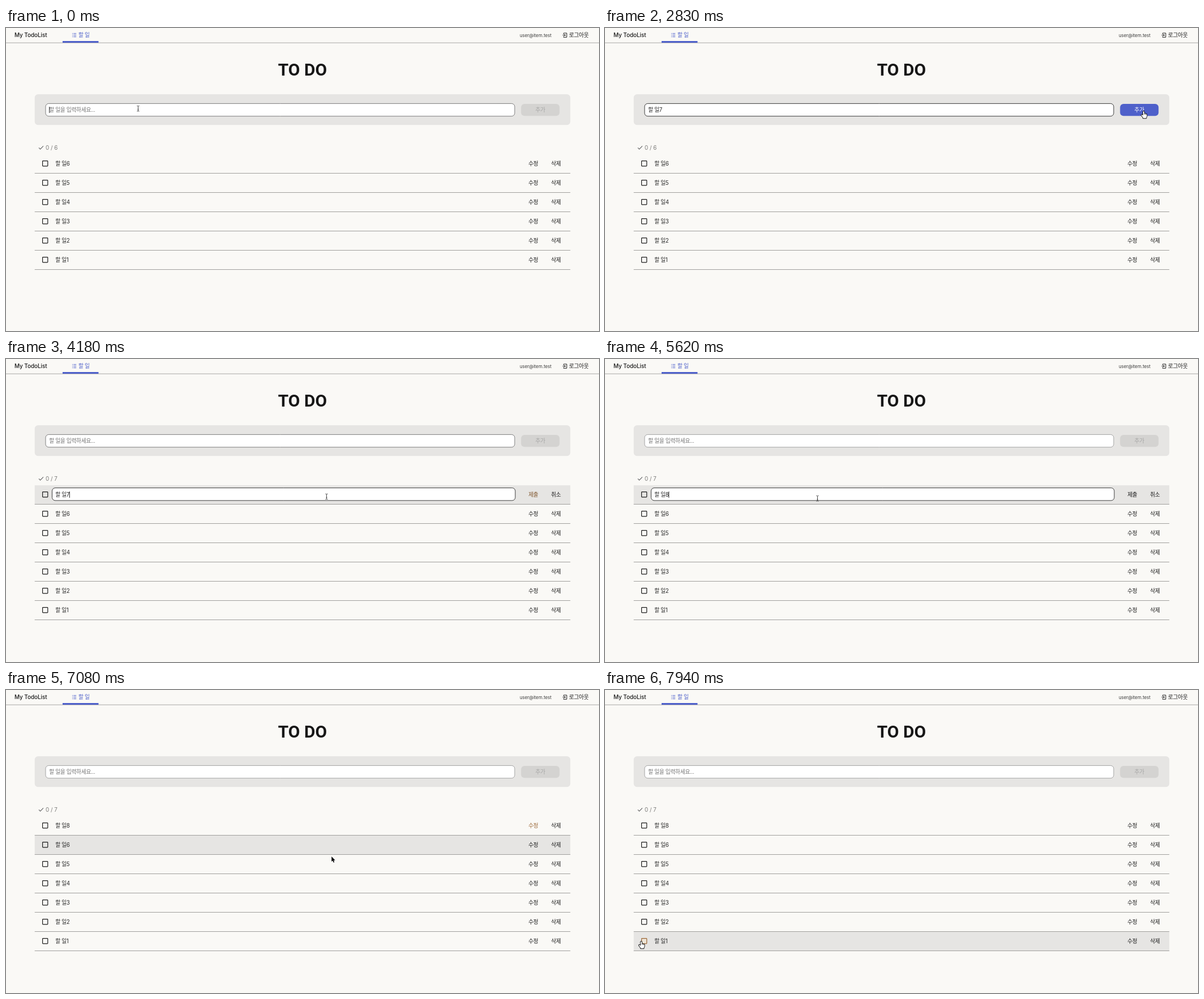
An HTML page with a canvas for the animation above (7.99 s loop, 1048x535 px).

```html
<!DOCTYPE html>
<html lang="ko">
<head>
<meta charset="utf-8">
<title>My TodoList</title>
<style>
  html, body { margin: 0; width: 100%; height: 100%; overflow: hidden; background: #faf9f6; }
  canvas { display: block; width: 1048px; height: 535px; }
</style>
</head>
<body>
<canvas id="stage"></canvas>
<script>
const W = 1048, H = 535, LOOP = 7990;
const TYPE = 680, KEY_GAP = 103, DIGIT = 2050, ADD = 2875;
const EDIT = 4050, ERASE = 5165, RETYPE = 5620, SUBMIT = 6690;
const BLINK = 550;
const LEFT = 50.7, RIGHT = 997.3, LIST_TOP = 223, ROW = 34;
const INK = [26, 26, 26], ACCENT = [186, 120, 58], BLUE = [78, 96, 202];
const GRAY = "#e6e5e3", LINE = "#a09f9d", BLUE_CSS = `rgb(${BLUE})`;
const SANS = "Inter, 'Noto Sans CJK KR', sans-serif";

const canvas = document.getElementById("stage");
const ctx = canvas.getContext("2d");
const dpr = window.devicePixelRatio || 1;
canvas.width = W * dpr;
canvas.height = H * dpr;

const home = { x: 233, y: 142 };
const glides = [
  { from: 2080, to: 2780, x: 952, y: 147 },
  { from: 3400, to: 3570, x: 966, y: 175 },
  { from: 3600, to: 3860, x: 932, y: 240 },
  { from: 4070, to: 4440, x: 375, y: 246 },
  { from: 5900, to: 6500, x: 930, y: 241 },
  { from: 7010, to: 7430, x: 98, y: 498 },
  { from: 7480, to: 7850, x: 64, y: 444 }
];

const stages = ["ㅎ", "하", "할", "할 ", "할 ㅇ", "할 이", "할 일"];
const keyTimes = stages.map((_, i) => TYPE + i * KEY_GAP);
const caretResets = [-120, ...keyTimes, DIGIT, ADD, EDIT, ERASE, RETYPE];

const clamp = v => Math.max(0, Math.min(1, v));
const ramp = (t, from, to, span = 200) => clamp((t - from) / span) - clamp((t - to) / span);
const mix = (a, b, k) => `rgb(${a.map((v, i) => Math.round(v + (b[i] - v) * k))})`;
const inside = (p, x0, y0, x1, y1) => p.x >= x0 && p.x <= x1 && p.y >= y0 && p.y <= y1;
const isEditing = t => t >= EDIT && t < SUBMIT;

// each glide starts fast and settles; y trails x, which bends the path
function pointer(t) {
  let { x, y } = home;
  for (const g of glides) {
    const k = 1 - (1 - clamp((t - g.from) / (g.to - g.from))) ** 3;
    x += (g.x - x) * k;
    y += (g.y - y) * k ** 1.85;
  }
  return { x, y };
}

function newItem(t) {
  if (t < TYPE || t >= ADD) return "";
  if (t >= DIGIT) return "할 일7";
  return stages[Math.min(stages.length - 1, Math.floor((t - TYPE) / KEY_GAP))];
}

const editedItem = t => "할 일" + (t < ERASE ? "7" : t < RETYPE ? "" : "8");

function text(str, x, cy, color, { size = 9.8, spacing = -0.38, weight = 400, align = "left" } = {}) {
  ctx.font = `${weight} ${size}px ${SANS}`;
  ctx.letterSpacing = spacing + "px";
  ctx.textAlign = align;
  ctx.fillStyle = color;
  ctx.fillText(str, x, cy + 3.6);
  return ctx.measureText(str).width;
}

function rect(x, y, w, h, color) {
  ctx.fillStyle = color;
  ctx.fillRect(x, y, w, h);
}

function strokePath(color, width) {
  ctx.strokeStyle = color;
  ctx.lineWidth = width;
  ctx.stroke();
}

function rounded(x, y, w, h, r, fill) {
  ctx.beginPath();
  ctx.roundRect(x, y, w, h, r);
  ctx.fillStyle = fill;
  ctx.fill();
}

function field(x, y, w, border) {
  rounded(x, y, w, 22.3, 5.5, "#fff");
  strokePath(border, 0.85);
}

function lines(color, width, d) {
  ctx.lineWidth = width;
  ctx.strokeStyle = color;
  ctx.stroke(new Path2D(d));
}

function header() {
  rect(0, 25.7, W, 0.9, LINE);
  text("My TodoList", 15, 12.6, "#1a1a1a", { size: 10, spacing: -0.1, weight: 500 });
  rect(100, 23, 63.5, 3, BLUE_CSS);
  for (let i = 0; i < 3; i++) {
    const y = 9.2 + i * 2.9;
    rect(117, y, 1.2, 1, BLUE_CSS);
    rect(119.3, y, 4.9, 1, BLUE_CSS);
  }
  text("할 일", 128, 12.6, BLUE_CSS);
  text("user@item.test", 964, 12.1, "#3a3a3a", { size: 7.9, spacing: 0, align: "right" });
  lines("#1a1a1a", 1, "M985.5 10.8V9H991V16.3H985.5V14.5M983.8 12.6H988.6M987 11L988.6 12.6 987 14.2");
  text("로그아웃", 995, 12.6, "#1a1a1a");
  ctx.font = "700 30px Roboto, sans-serif";
  ctx.letterSpacing = "0px";
  ctx.textAlign = "center";
  ctx.fillStyle = "#171717";
  ctx.fillText("TO DO", 524, 83.7);
}

function caret(t, x, y) {
  const last = Math.max(...caretResets.filter(r => r <= t));
  if (Math.floor((t - last) / BLINK) % 2 === 0) rect(x, y, 1, 11, "#222");
}

function form(t) {
  const focus = ramp(t, -70, EDIT), ready = ramp(t, TYPE, ADD);
  rounded(LEFT, 117, RIGHT - LEFT, 54.3, 6, GRAY);
  field(70, 133.4, 829, mix([150, 150, 150], INK, focus));
  const value = newItem(t), x = 76.2;
  const width = text(value || "할 일을 입력하세요...", x, 144.4, value ? "#2b2b2b" : "#757575");
  if (t < EDIT) caret(t, value ? x + width : x, 139);
  const composing = value && t < DIGIT && !value.endsWith(" ");
  if (composing) {
    const before = ctx.measureText(value.slice(0, -1)).width;
    rect(x + before, 149.3, width - before, 1, "#222");
  }
  rounded(910.3, 134, 68, 21.2, 6, mix([212, 211, 209], BLUE, ready));
  text("추가", 944.2, 144.4, mix([166, 166, 165], [255, 255, 255], ready), { spacing: -0.2, align: "center" });
}

function row(t, index, label, hovered, isLast) {
  const top = LIST_TOP + index * ROW, cy = top + 16;
  const edit = index === 0 && isEditing(t);
  if (hovered) rect(LEFT, top, RIGHT - LEFT, ROW, GRAY);
  rect(LEFT, top + ROW - 1, RIGHT - LEFT, 1, LINE);

  const check = isLast ? ramp(t, 7820, 2 * LOOP, 150) : 0;
  rounded(64.6, cy - 4.4, 9.2, 9.2, 0.8, `rgba(244,228,206,${check * 0.7})`);
  strokePath(mix(INK, ACCENT, check), 1.2);

  if (edit) {
    field(81.5, top + 4.6, 818.5, "#1a1a1a");
    const width = text(editedItem(t), 87.2, cy, "#2b2b2b");
    caret(t, 87 + width, cy - 5);
  } else {
    text(label, 87.2, cy, "#2b2b2b");
  }
  const hot = index ? 0 : ramp(t, 3780, 4110) + ramp(t, 6250, 7040);
  text(edit ? "제출" : "수정", 923.2, cy, mix(INK, ACCENT, hot));
  text(edit ? "취소" : "삭제", 963.2, cy, "#1a1a1a");
}

function list(t) {
  const count = t < ADD ? 6 : 7;
  lines("#666", 1.1, "M58 211.3L60.6 214 66 208.4");
  text(`0 / ${count}`, 70, 211, "#7b7b79", { spacing: 0 });
  // the highlight trails the pointer and stays on the last row when it dips below
  const over = Math.min(count - 1, Math.floor((pointer(t - 30).y - LIST_TOP) / ROW));
  for (let i = 0; i < count; i++) {
    const number = i === 0 && t >= SUBMIT ? 8 : count - i;
    row(t, i, "할 일" + number, i === over, i === 6);
  }
}

const shapes = {
  arrow: new Path2D("M0 0V9L2.1 7.1 3.5 10.6 5 10 3.6 6.6H6.4Z"),
  hand: new Path2D("M-1 .8Q0-.8 1 .8V4.2Q2 3.5 2.7 4.5 3.8 4 4.3 5 5.5 4.8 5.6 6V8.5Q5.4 10 4.5 11V12.3H-1V11.2L-4 7.3Q-4.5 5.8-3 5.9L-1 7.5Z"),
  fingers: new Path2D("M1 4.2V6M2.7 4.5V6.2M4.3 5V6.4"),
  beam: new Path2D("M-2-4.6Q0-4.6 0-3.6Q0-4.6 2-4.6M0-3.6V4M-2 5Q0 5 0 4Q0 5 2 5M-1 1.8H1")
};

function cursorKind(t, p) {
  if (inside(p, 70, 133, 899, 156) || isEditing(t) && inside(p, 81, 227, 900, 250)) return "beam";
  const overButton = t < ADD && inside(p, 910, 133, 978, 156);
  const overAction = inside(p, 918, 230, 945, 248);
  const overCheck = inside(p, 58, 434, 78, 450);
  return overButton || overAction || overCheck ? "hand" : "arrow";
}

function cursor(t) {
  const p = pointer(t), kind = cursorKind(t, p);
  ctx.save();
  ctx.translate(p.x, p.y);
  ctx.lineJoin = "round";
  if (kind === "beam") {
    ctx.translate(0.5, 0);
    ctx.lineWidth = 0.9;
    ctx.strokeStyle = "#333";
    ctx.stroke(shapes.beam);
  } else {
    const dark = kind === "arrow";
    ctx.lineWidth = dark ? 1.2 : 1.8;
    ctx.strokeStyle = dark ? "#fff" : "#111";
    ctx.stroke(shapes[kind]);
    ctx.fillStyle = dark ? "#000" : "#fff";
    ctx.fill(shapes[kind]);
    if (!dark) {
      ctx.lineWidth = 0.6;
      ctx.stroke(shapes.fingers);
    }
  }
  ctx.restore();
}

function draw(t) {
  ctx.setTransform(dpr, 0, 0, dpr, 0, 0);
  rect(0, 0, W, H, "#faf9f6");
  header();
  form(t);
  list(t);
  cursor(t);
}

const start = performance.now();
function tick() {
  draw((performance.now() - start) % LOOP);
  requestAnimationFrame(tick);
}
tick();
</script>
</body>
</html>
```
